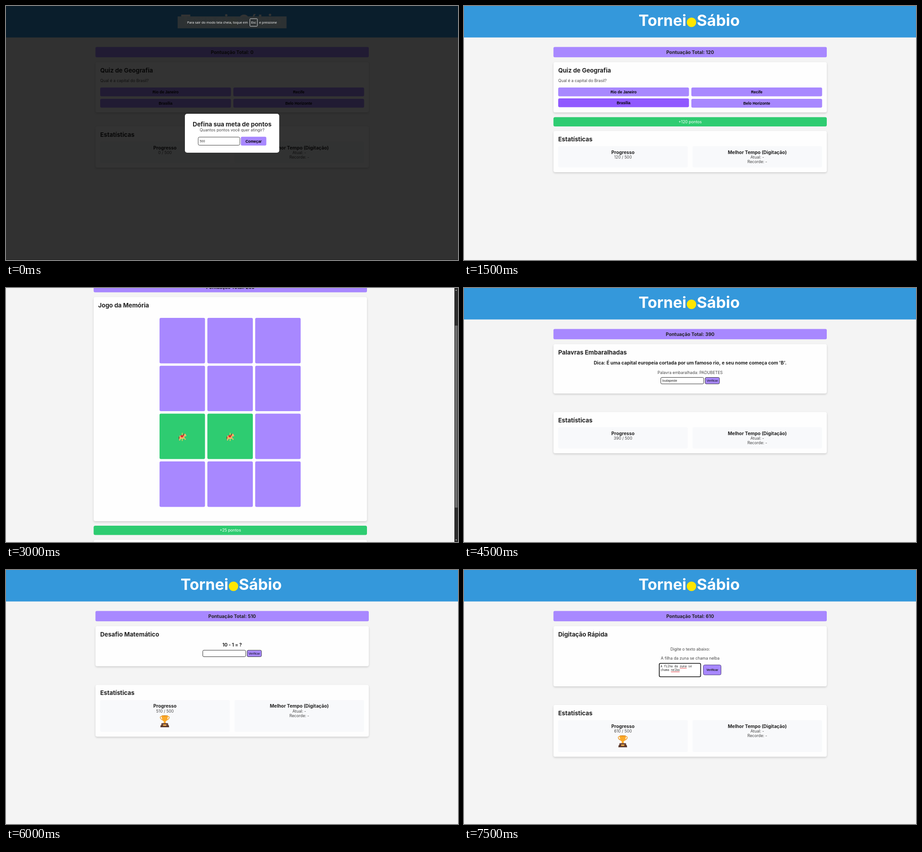
These frames come from a looping animation (998x561 px, 8000 ms). An HTML page with a canvas:

```html
<!DOCTYPE html>
<html lang="pt-BR">
<head>
<meta charset="utf-8">
<title>Quiz</title>
<style>
html, body { margin: 0; width: 100%; height: 100%; overflow: hidden; background: #f4f4f4; }
canvas { display: block; width: 998px; height: 561px; }
</style>
</head>
<body>
<canvas id="stage"></canvas>
<script>
const W = 998, H = 561, LOOP = 8000, STEP = 1500;
const PURPLE = '#a888ff', HOVER = '#9059ff', GREEN = '#2ecc71', INK = '#222', SOFT = '#484848';
const UI = 'Inter, sans-serif', SANS = '"Liberation Sans", Arial, sans-serif';
const MONO = '"Noto Sans Mono", monospace', NOTICE = '"Open Sans", sans-serif';

const canvas = document.getElementById('stage');
const ctx = canvas.getContext('2d');
const dpr = window.devicePixelRatio || 1;
canvas.width = W * dpr;
canvas.height = H * dpr;

// y is the middle of the capital letters
function text(str, x, y, size, o = {}) {
  ctx.font = `${o.weight || 400} ${size}px ${o.font || UI}`;
  ctx.textAlign = o.align || 'center';
  ctx.fillStyle = o.color || SOFT;
  ctx.fillText(str, x, y + size * 0.36);
}
const bold = (str, x, y, size, o = {}) => text(str, x, y, size, { weight: 700, color: INK, ...o });
const heading = (str, x, y) => bold(str, x, y, 13.3, { align: 'left' });
const body = (str, x, y, o) => text(str, x, y, 8.8, o);

function box(x, y, w, h, r, fill, border, line = 1) {
  ctx.beginPath();
  ctx.roundRect(x, y, w, h, r);
  ctx.fillStyle = fill;
  ctx.fill();
  if (border) {
    ctx.strokeStyle = border;
    ctx.lineWidth = line;
    ctx.stroke();
  }
}

function poly(color, ...pts) {
  ctx.beginPath();
  for (let i = 0; i < pts.length; i += 2) ctx.lineTo(pts[i], pts[i + 1]);
  ctx.closePath();
  ctx.fillStyle = color;
  ctx.fill();
}

function card(x, top, bottom) {
  ctx.save();
  ctx.shadowColor = 'rgba(0,0,0,.16)';
  ctx.shadowBlur = 4 * dpr;
  ctx.shadowOffsetY = 2 * dpr;
  box(x, top, 603.5, bottom - top, 4, '#fefefe');
  ctx.restore();
}

function button(label, x, y, w, h, fill = PURPLE) {
  box(x, y, w, h, 3, fill);
  bold(label, x + w / 2, y + h / 2, 8.4, { font: SANS, color: '#000' });
}

function toast(label, x, y) {
  box(x, y, 603.5, 20.4, 3.5, GREEN);
  body(label, x + 301.7, y + 10.2, { color: '#fff' });
}

function page(score) {
  ctx.fillStyle = '#f4f4f4';
  ctx.fillRect(0, 0, W, H);
  ctx.fillStyle = '#3498db';
  ctx.fillRect(0, 0, W, 69.5);
  const white = { color: '#fff' };
  bold('Tornei', 491, 31.5, 34, { ...white, align: 'right' });
  bold('Sábio', 514, 31.5, 34.5, { ...white, align: 'left' });
  ctx.beginPath();
  ctx.arc(502.3, 36, 10.5, 0, 7);
  ctx.fillStyle = '#ffe600';
  ctx.fill();
  scoreBar(197.5, 90.5, score);
}

function scoreBar(x, y, score) {
  box(x, y, 603.5, 22.7, 3, PURPLE);
  bold('Pontuação Total: ' + score, x + 301.8, y + 11.4, 10.3);
}

function stats(top, bottom, points) {
  card(197.5, top, bottom);
  heading('Estatísticas', 208, top + 18);
  const h = bottom - top - 44;
  box(208, top + 33.5, 286, h, 3, '#f8f9fb');
  box(504.5, top + 33.5, 286, h, 3, '#f8f9fb');
  bold('Progresso', 351, top + 47, 10.3);
  body(points + ' / 500', 351, top + 58);
  bold('Melhor Tempo (Digitação)', 647.5, top + 47, 10.3);
  body('Atual: -', 647.5, top + 58);
  body('Recorde: -', 647.5, top + 68);
  if (points >= 500) trophy(350.5, top + 67);
}

function trophy(x, y) {
  ctx.save();
  ctx.translate(x, y);
  ctx.strokeStyle = '#f39a22';
  ctx.lineWidth = 1.5;
  for (const s of [-1, 1]) {
    ctx.beginPath();
    ctx.moveTo(s * 6, 3);
    ctx.bezierCurveTo(s * 12, 1.5, s * 11, 8.5, s * 4, 11);
    ctx.stroke();
  }
  ctx.beginPath();
  ctx.moveTo(-7, 1);
  ctx.bezierCurveTo(-6.5, 9, -4.5, 13, -1.6, 14);
  ctx.lineTo(-3, 18);
  ctx.lineTo(3, 18);
  ctx.lineTo(1.6, 14);
  ctx.bezierCurveTo(4.5, 13, 6.5, 9, 7, 1);
  ctx.fillStyle = '#fba928';
  ctx.fill();
  ctx.beginPath();
  ctx.ellipse(0, 1.2, 7, 1, 0, 0, 7);
  ctx.fillStyle = '#d9861c';
  ctx.fill();
  poly('#6d4638', -7, 17.5, 7, 17.5, 8, 22, -8, 22);
  poly('#573529', -9, 22, 9, 22, 9.7, 26.5, -9.7, 26.5);
  ctx.fillStyle = '#f5b04a';
  ctx.fillRect(-3.5, 20.5, 7, 3);
  ctx.restore();
}

function horse(x, y) {
  ctx.save();
  ctx.translate(x, y);
  poly('#8d4a2f', -5, -2, -8, 0, -8, 5, -6, 3);
  poly('#f3b56b', -6, -3, 1, -3, 4, -7, 7, -7, 9, -3, 8, -1, 5, -2, 5, 3,
    8, 4, 7, 7, 4, 4, -3, 4, -5, 8, -7, 8, -6, 2);
  poly('#8d4a2f', 1, -3, 3, -7, 5, -8, 4, -4, 2, -1);
  poly('#df2f36', -4, -4, 2, -4, 2, 1, -3, 1);
  ctx.fillStyle = '#f8d34c';
  ctx.fillRect(-0.8, -9, 1.5, 5);
  ctx.fillRect(-0.8, 4, 1.5, 5);
  ctx.fillRect(-4, 1, 6, 1);
  ctx.restore();
}

function quiz(picked) {
  card(197.5, 124, 235);
  heading('Quiz de Geografia', 208, 142);
  body('Qual é a capital do Brasil?', 208, 164.5, { align: 'left' });
  button('Rio de Janeiro', 208, 180, 288.7, 19.6);
  button('Recife', 502, 180, 288.7, 19.6);
  button('Brasília', 208, picked ? 204 : 205, 288.7, 19.6, picked ? HOVER : PURPLE);
  button('Belo Horizonte', 502, 205, 288.7, 19.6);
}

function answer(y, value) {
  box(434.5, y + 0.5, 94.7, 14.3, 2.5, '#fff', '#333');
  text(value, 438, y + 7.7, 7, { font: SANS, align: 'left', color: '#222' });
  box(532.5, y + 0.5, 31.5, 14.3, 2.5, PURPLE, '#333');
  text('Verificar', 548.2, y + 7.7, 7, { font: SANS, color: '#111' });
}

function goal() {
  page(0);
  quiz(false);
  stats(266, 357, 0);
  ctx.fillStyle = 'rgba(0,0,0,.8)';
  ctx.fillRect(0, 0, W, H);
  ctx.fillStyle = '#202020';
  ctx.fillRect(0, 560, W, 1);

  box(395, 238, 208.3, 86, 5, '#fff');
  bold('Defina sua meta de pontos', 499.2, 261.3, 13.4);
  body('Quantos pontos você quer atingir?', 499.2, 273.7);
  box(424.3, 289.5, 92, 18, 3, '#fff', '#444');
  text('500', 427.7, 298.7, 7, { font: SANS, align: 'left', color: '#333' });
  button('Começar', 518.5, 288.7, 56.3, 19.6);

  ctx.fillStyle = 'rgba(46,50,52,.94)';
  ctx.fillRect(379, 23, 240.5, 26.3);
  const light = { font: NOTICE, color: '#fff' };
  text('Para sair do modo tela cheia, toque em', 400, 36, 7.35, { ...light, align: 'left' });
  box(538.5, 28, 16.5, 16.8, 1.5, 'transparent', '#ddd');
  text('Esc', 546.8, 36, 7.35, light);
  text('e pressione', 559, 36, 7.3, { ...light, align: 'left' });
}

function geography() {
  page(120);
  quiz(true);
  toast('+120 pontos', 197.5, 245.5);
  stats(276, 367, 120);
}

function memory() {
  ctx.fillStyle = '#f4f4f4';
  ctx.fillRect(0, 0, W, H);
  scoreBar(193.5, -13.3, 265);
  card(193.5, 20, 515);
  heading('Jogo da Memória', 203.5, 38);
  for (let i = 0; i < 12; i++) {
    const x = 339 + (i % 3) * 105.6, y = 66 + Math.floor(i / 3) * 105.7;
    const open = i === 6 || i === 7;
    box(x, y, 100.4, 100.4, 3, open ? GREEN : PURPLE);
    if (open) horse(x + 50.2, y + 51.5);
  }
  toast('+25 pontos', 193.5, 525);
  card(193.5, 556, 640);

  ctx.fillStyle = '#2c2c2c';
  ctx.fillRect(990, 0, 8, H);
  ctx.fillStyle = '#6b6b6b';
  ctx.fillRect(991, 83, 6, 402);
  poly('#bbb', 992, 6, 996, 6, 994, 3.5);
  poly('#bbb', 992, 555.5, 996, 555.5, 994, 558);
}

function words() {
  page(390);
  card(197.5, 124, 233);
  heading('Palavras Embaralhadas', 208, 142);
  bold("Dica: É uma capital europeia cortada por um famoso rio, e seu nome começa com 'B'.", 499.3, 165.5, 10.3);
  body('Palavra embaralhada: PADUBETES', 499.3, 187);
  answer(197, 'budapeste');
  stats(274, 365, 390);
}

function sums() {
  page(510);
  card(197.5, 124, 212.5);
  heading('Desafio Matemático', 208, 142);
  bold('10 - 1 = ?', 499.3, 165.5, 10.3);
  answer(176.7, '');
  stats(253.7, 368, 510);
}

function squiggle(x, y, w) {
  ctx.beginPath();
  for (let i = 0; i <= w; i++) ctx.lineTo(x + i, y + (i % 2 ? 0.7 : -0.7));
  ctx.strokeStyle = '#e0262b';
  ctx.lineWidth = 0.8;
  ctx.stroke();
}

function typing() {
  page(610);
  card(197.5, 124, 257);
  heading('Digitação Rápida', 208, 142);
  body('Digite o texto abaixo:', 499.3, 175);
  body('A filha da zuna se chama nelba', 499.3, 195.3);
  box(431.2, 206.2, 91.3, 29.5, 2.5, '#fff', '#111', 1.6);
  const mono = { font: MONO, align: 'left', color: '#222' };
  text('A filha da zuna se', 434, 213, 6.4, mono);
  text('chama nelba', 434, 221, 6.4, mono);
  squiggle(476.5, 217, 15);
  squiggle(457, 225, 19);
  ctx.strokeStyle = '#777';
  ctx.lineWidth = 0.6;
  ctx.beginPath();
  ctx.moveTo(518, 234);
  ctx.lineTo(521, 231);
  ctx.stroke();
  box(528.5, 209.7, 39, 22, 3, PURPLE, '#4b3c78');
  bold('Verificar', 548.2, 220.8, 6.6, { font: SANS });
  stats(298, 412.5, 610);
}

const scenes = [goal, geography, memory, words, sums, typing];

function draw() {
  const t = performance.now() % LOOP;
  ctx.setTransform(dpr, 0, 0, dpr, 0, 0);
  scenes[Math.floor(t / STEP)]();
  requestAnimationFrame(draw);
}
draw();
</script>
</body>
</html>
```
